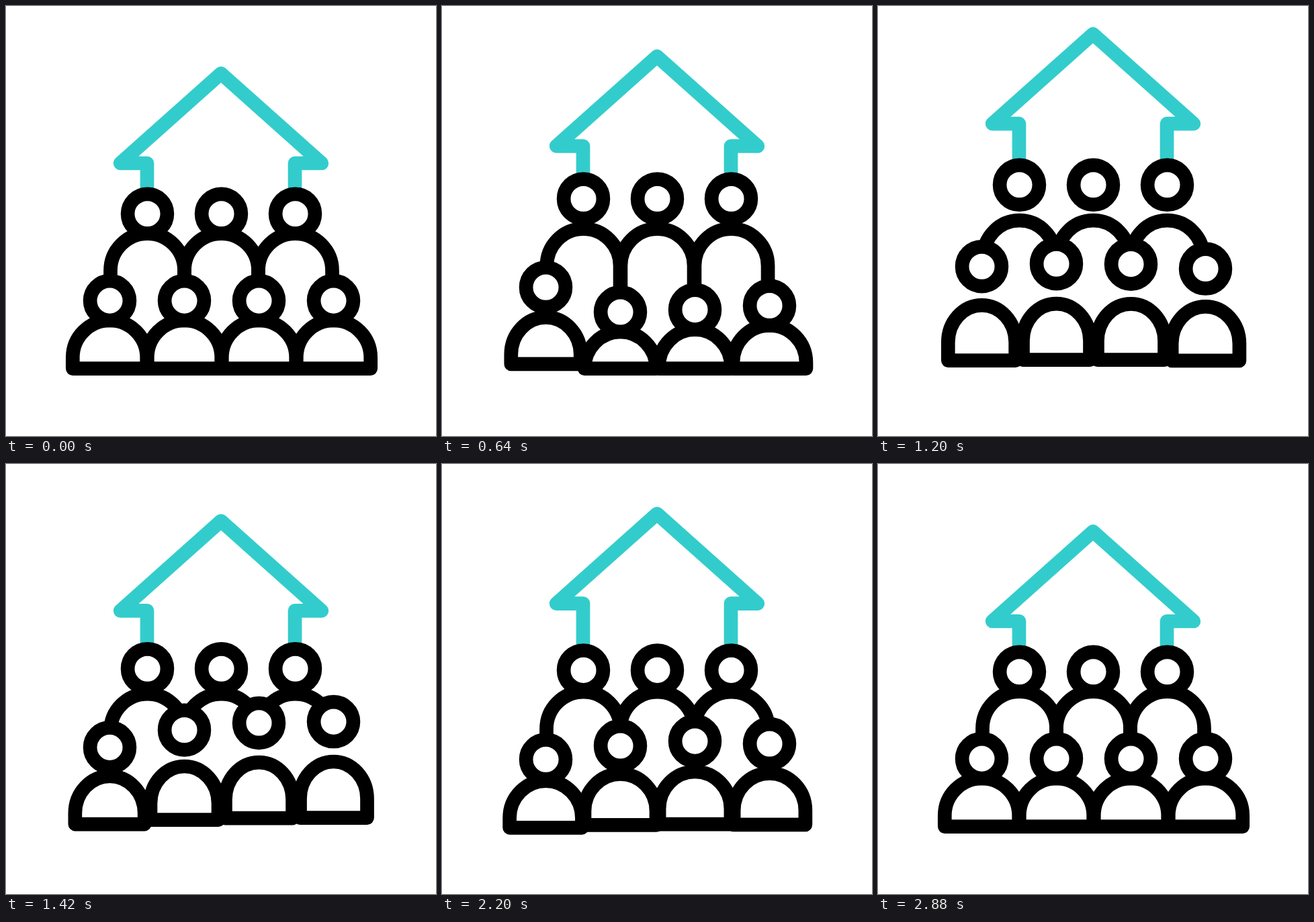
Animation, 640 px wide and 640 px high, one loop 3600 ms. Source, as an HTML page with a canvas:

```html
<!DOCTYPE html>
<html lang="en">
<head>
<meta charset="utf-8">
<title>Community home</title>
<style>
  html, body { margin: 0; width: 100%; height: 100%; overflow: hidden; background: #fff; }
  canvas { display: block; width: 100vw; height: 100vh; object-fit: contain; }
</style>
</head>
<body>
<canvas id="stage" width="640" height="640"></canvas>
<script>
const ctx = document.getElementById('stage').getContext('2d');
const LOOP = 3600, STAGGER = 133, LINE = 20.7, HALF = 55.2;
const BLACK = '#000', TEAL = '#33cccc';

const speedUp = power => u => u ** power;
const slowDown = power => u => 1 - (1 - u) ** power;
const sway = u => u * u * (3 - 2 * u);
const leap = slowDown(2.8), drop = speedUp(2.8);   // high jump
const bob = slowDown(2), dip = speedUp(2);         // small rebound

// Each pose: arrival time, easing towards it, then the shifts
// Front person: head, shoulders, base, half width
const FRONT = [
  [0, sway, 0, 0, 0, HALF],
  [530, sway, 17, 17, 0, 53.5],
  [1020, leap, -55, -25, -13, 50],
  [1515, drop, 14, 14, 4, 53],
  [1933, bob, -26, -10, -3.5, 53.4],
  [2233, dip, 8, 7, 3, 54],
  [2480, sway, 0, 0, 0, HALF]
];

// Back person: head, shoulders
const BACK = [
  [0, sway, 0, 0],
  [510, sway, 16, 16],
  [990, leap, -49, -23],
  [1470, drop, 11, 13],
  [2000, bob, -10, -3],
  [2263, dip, 3, 3],
  [2480, sway, 0, 0]
];

const HOUSE = [
  [0, sway, 0],
  [500, sway, 32],
  [1010, leap, -64.5],
  [1520, drop, 25],
  [1700, sway, 25],
  [2180, bob, -26.5],
  [2480, dip, 4],
  [2780, sway, 0]
];

// Shifts of a pose list at time t
function pose(list, t) {
  const next = list.findIndex(p => p[0] > t);
  if (t <= 0 || next < 0) return list[0].slice(2);
  const a = list[next - 1], b = list[next];
  const u = b[1]((t - a[0]) / (b[0] - a[0]));
  return a.slice(2).map((v, i) => v + (b[i + 2] - v) * u);
}

function head(x, y) {
  ctx.beginPath();
  ctx.arc(x, y, 29.4, 0, Math.PI * 2);
  ctx.fill();
  ctx.stroke();
}

function body(x, top, base, half, closed) {
  const rise = Math.min(HALF, base - top);
  ctx.beginPath();
  ctx.moveTo(x - half, base);
  ctx.ellipse(x, top + rise, half, rise, 0, Math.PI, Math.PI * 2);
  ctx.lineTo(x + half, base);
  if (closed) {
    ctx.closePath();
    ctx.fill();
  }
  ctx.stroke();
}

function house(shift, foot) {
  const eave = 234 + shift;
  const side = dir => [[110, foot], [110, eave], [149.8, eave]].map(([x, y]) => [320 + dir * x, y]);
  const points = [...side(-1), [320, 100.4 + shift], ...side(1).reverse()];
  ctx.beginPath();
  points.forEach(([x, y]) => ctx.lineTo(x, y));
  ctx.stroke();
}

function draw(t) {
  ctx.fillStyle = '#fff';
  ctx.fillRect(0, 0, 640, 640);
  ctx.lineWidth = LINE;
  ctx.lineJoin = 'round';

  const [nod, lift] = pose(BACK, t);
  const backHead = 309.3 + nod;
  ctx.strokeStyle = TEAL;
  house(pose(HOUSE, t)[0], backHead);

  ctx.strokeStyle = BLACK;
  for (let i = 0; i < 3; i++) {
    const x = 210.5 + 110 * i;
    body(x, 338.6 + lift, 418, 55 - Math.max(0, -lift) / 16, false);
    head(x, backHead);
  }

  for (let i = 0; i < 4; i++) {
    const x = 154.5 + 111 * i;
    const [tilt, top, base, half] = pose(FRONT, t - STAGGER * i);
    body(x, 468 + top, 539.6 + base, half, true);
    head(x, 438.6 + tilt);
  }
}

const start = performance.now();
function tick() {
  draw((performance.now() - start) % LOOP);
  requestAnimationFrame(tick);
}
tick();
</script>
</body>
</html>
```
